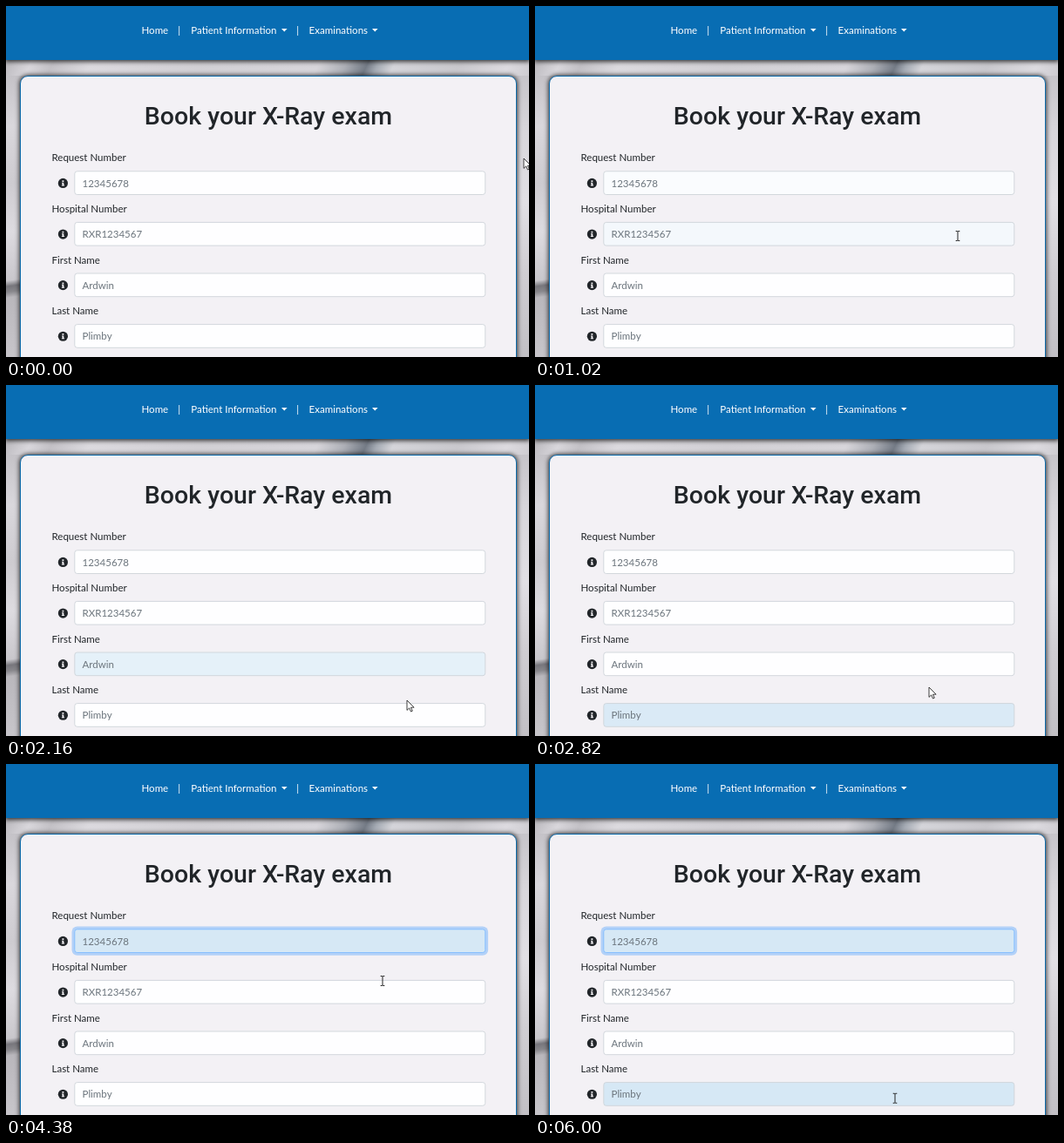
Animation of 600x403 px, one loop 6.06 s. Source, as an HTML page:

```html
<!DOCTYPE html>
<html lang="en">
<head>
<meta charset="utf-8">
<title>Book your X-Ray exam</title>
<style>
html, body { margin: 0; width: 100%; height: 100%; overflow: hidden; }
#stage { position: relative; width: 600px; height: 403px; overflow: hidden; background: #d3d1d6; }
#stage > * { position: absolute; }
.top { inset: 60px 0 auto; height: 50px;
  background: linear-gradient(115deg, #b9b7bc 0, #d9d7dc 5%, #c3c1c6 9%, #dcdadf 16%, #d2d0d5 36%, #d8d6db 58%,
    #aeb0b7 63%, #747b86 67%, #a5abb4 69%, #d5d5da 72%, #c9c8cd 84%, #dddbe0 93%, #c6c4c9 100%); }
.left { inset: 80px auto 0 0; width: 30px;
  background: linear-gradient(172deg, #c4c2c7 0, #d9d7dc 18%, #cdcbd0 38%, #dddbe0 55%, #c9c7cc 72%, #77767c 74%, #88878c 76%, #b9b7bc 78%, #c8c6cb 100%); }
.right { inset: 80px 0 0 auto; width: 30px;
  background: linear-gradient(#c6c4c9 0, #d8d6db 20%, #e1dfe4 45%, #cfcdd2 70%, #c2c0c5 100%); }
header { inset: 0 0 auto; height: 61.5px; background: #086db3; box-shadow: 0 1px 5px 1px rgba(0, 0, 0, .75); }
.card { left: 16px; top: 79.5px; width: 567.5px; height: 360px; border: 1.6px solid #0b69a8; border-radius: 9px;
  background: #f3f1f5; box-shadow: 0 0 5px 1px rgba(0, 0, 0, .7); }
svg { left: 0; top: 0; }
text { font: 11.52px Lato, sans-serif; fill: #212529; }
.nav text { fill: #fff; }
.nav path { fill: #fff; }
text.title { font: 500 28.5px Roboto, sans-serif; text-anchor: middle; }
text.hint { fill: #6c757d; }
</style>
</head>
<body>
<div id="stage">
  <div class="top"></div><div class="left"></div><div class="right"></div>
  <header></header>
  <div class="card"></div>
  <svg id="art" width="600" height="403" viewBox="0 0 600 403">
    <g class="nav">
      <text x="155.5" y="32">Home</text>
      <text x="197.3" y="32">|</text>
      <text x="212.3" y="32">Patient Information</text>
      <path d="M316 26h6.6l-3.3 3.4z"/>
      <text x="333.2" y="32">|</text>
      <text x="347.6" y="32">Examinations</text>
      <path d="M420 26h6.6l-3.3 3.4z"/>
    </g>
    <text class="title" x="301" y="136.3">Book your X-Ray exam</text>
    <g id="form"></g>
    <path id="caret" d="M88.5 197v13" stroke="#212529" stroke-width=".9"/>
    <path id="arrow" d="M0 0V11.4L2.7 8.9 4.5 13 6.3 12.2 4.5 8.2H8.1Z" fill="#fff" stroke="#111" stroke-width=".8"/>
    <path id="beam" d="M-2.3 -5.5h1.6l.7 .6 .7-.6h1.6M0 -5V5M-2.3 5.5h1.6l.7-.6 .7 .6h1.6" fill="none" stroke="#222" stroke-width="1"/>
  </svg>
</div>
<script>
const LOOP = 6060, STEP = 60, FADE = 500, CLICK = 3400, BLINK = 500;
const BOX = { x: 78.8, y: 189.8, w: 471, h: 26.7, gap: 58.6 };
const ROWS = [
  ['Request Number', '12345678'],
  ['Hospital Number', 'RXR1234567'],
  ['First Name', 'Ardwin'],
  ['Last Name', 'Plimby'],
];
// Pointer path: time, x, y
const PATH = [
  [0, 594, 175], [60, 592, 176], [300, 550, 193], [500, 508, 204], [720, 492, 217], [930, 486, 249],
  [1020, 485, 264], [1260, 481, 268], [1400, 477, 276], [1560, 472, 307], [1700, 469, 318], [1920, 466, 323],
  [2040, 463, 334], [2160, 460, 362], [2300, 458, 378], [2640, 456, 384], [2700, 455, 381], [2770, 453, 365],
  [2820, 452, 347], [3000, 446, 280], [3170, 439, 216], [3240, 437, 202], [4020, 437, 202], [4140, 436, 207],
  [4380, 432, 249], [4560, 428, 266], [4700, 425, 277], [4800, 422, 307], [4960, 419, 318], [5220, 417, 321],
  [5380, 416, 326], [5500, 415, 357], [5620, 414, 376], [5800, 413, 383], [6060, 413, 384],
];

const $ = id => document.getElementById(id);
const mix = (a, b, k) => a + (b - a) * k;
const tint = (a, b, k) => `rgb(${a.map((v, i) => mix(v, b[i], k))})`;
const rowY = i => BOX.y + i * BOX.gap;

function add(tag, attrs, label) {
  const el = document.createElementNS('http://www.w3.org/2000/svg', tag);
  for (const key in attrs) el.setAttribute(key, attrs[key]);
  if (label) el.textContent = label;
  return $('form').appendChild(el);
}

const ring = add('rect', { fill: '#007bff' });
const fields = ROWS.map(([label, hint], i) => {
  const y = rowY(i), mid = y + BOX.h / 2;
  add('text', { x: 52.5, y: y - 11.4 }, label);
  add('circle', { cx: 65.4, cy: mid + .3, r: 5.6, fill: '#212529' });
  add('path', { d: `M64.5 ${mid - 2.9}h1.8v1.7h-1.8zM64 ${mid - .5}h2.3v2.7h.7v1.1h-3.1v-1.1h.7v-1.6h-.6z`, fill: '#f3f1f5' });
  const box = add('rect', { x: BOX.x, y, width: BOX.w, height: BOX.h, rx: 2.9, 'stroke-width': .9 });
  add('text', { class: 'hint', x: 87.5, y: y + 17.8 }, hint);
  return box;
});

// CSS "ease" curve
function ease(x) {
  if (x <= 0) return 0;
  if (x >= 1) return 1;
  const bez = (u, a, b) => 3 * (1 - u) * (1 - u) * u * a + 3 * (1 - u) * u * u * b + u ** 3;
  let lo = 0, hi = 1;
  for (let n = 0; n < 24; n++) {
    const u = (lo + hi) / 2;
    if (bez(u, .25, .25) < x) lo = u; else hi = u;
  }
  return bez(lo, .1, 1);
}

function pointer(t) {
  const n = PATH.findIndex(p => p[0] > t);
  const [t0, x0, y0] = PATH[n - 1], [t1, x1, y1] = PATH[n];
  const k = (t - t0) / (t1 - t0);
  return [mix(x0, x1, k), mix(y0, y1, k)];
}

const over = ([x, y], i) =>
  x >= BOX.x && x <= BOX.x + BOX.w && y >= rowY(i) && y <= rowY(i) + BOX.h;

// Spans of time in which each field is hovered or focused
const spans = ROWS.map((_, i) => {
  const list = [];
  let active = false;
  for (let t = 0; t < LOOP; t += 5) {
    const now = over(pointer(t), i) || (i === 0 && t >= CLICK);
    if (now && !active) list.push([t, LOOP]);
    if (!now && active) list[list.length - 1][1] = t;
    active = now;
  }
  return list;
});

function glow([on, off], t) {
  if (t < on) return 0;
  const peak = ease((Math.min(t, off) - on) / FADE);
  return t < off ? peak : peak * (1 - ease((t - off) / (FADE * peak)));
}

function draw(t) {
  const focus = ease((t - CLICK) / FADE);
  fields.forEach((box, i) => {
    const lit = Math.max(0, ...spans[i].map(s => glow(s, t)));
    box.setAttribute('fill', tint([254, 254, 255], [214, 232, 245], lit));
    box.setAttribute('stroke', tint([206, 212, 218], [128, 189, 255], i ? 0 : focus));
  });

  const grow = .4 + 2.9 * focus;
  const shape = { x: BOX.x - grow, y: BOX.y - grow, width: BOX.w + 2 * grow, height: BOX.h + 2 * grow,
    rx: 2.9 + grow, opacity: .27 * focus };
  for (const key in shape) ring.setAttribute(key, shape[key]);

  const blinkOn = t >= CLICK && Math.floor((t - CLICK) / BLINK) % 2 === 0;
  $('caret').setAttribute('visibility', blinkOn ? 'visible' : 'hidden');

  const at = pointer(t), typing = ROWS.some((_, i) => over(at, i));
  for (const [id, show] of [['arrow', !typing], ['beam', typing]]) {
    $(id).setAttribute('visibility', show ? 'visible' : 'hidden');
    $(id).setAttribute('transform', `translate(${at})`);
  }
}

const start = performance.now();
function tick() {
  const t = (performance.now() - start) % LOOP;
  draw(Math.floor(t / STEP) * STEP);
  requestAnimationFrame(tick);
}
tick();
</script>
</body>
</html>
```
